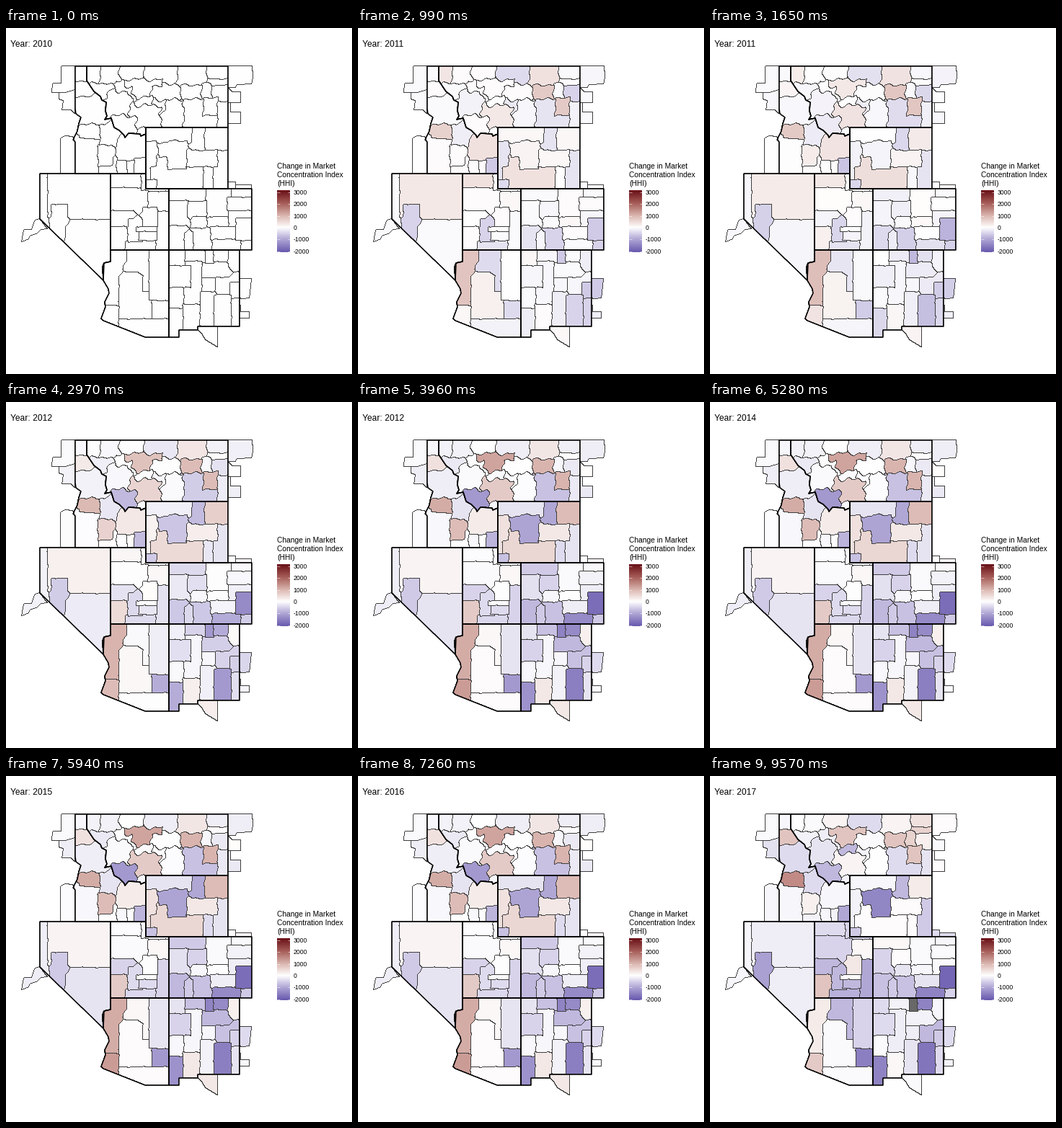
A matplotlib script that plays this animation: 480x480 px, repeating every 9900 ms.

```python
import numpy as np
import matplotlib.pyplot as plt
from matplotlib.animation import FuncAnimation
from matplotlib.colors import LinearSegmentedColormap
from matplotlib.patches import Polygon
from matplotlib.path import Path

SIZE, FRAMES, STEP = 480, 30, 330
YEARS = [2010, 2011, 2012, 2014, 2015, 2016, 2017]
KEYS = [0, 3, 12, 23, 29]
LOW, HIGH = -21, 31.5
LINE = (0.25, 0.25, 0.25)

STOPS = [(LOW, "#6858ae"), (-10, "#b1a8d6"), (0, "#ffffff"),
         (10, "#dab5af"), (20, "#a9625d"), (HIGH, "#6a1017")]
ramp = LinearSegmentedColormap.from_list(
    "hhi", [((v - LOW) / (HIGH - LOW), c) for v, c in STOPS], 512)

fig = plt.figure(figsize=(4.8, 4.8), dpi=100, facecolor="white")
ax = fig.add_axes([0, 0, 1, 1])
ax.axis("off")

Y, X = np.mgrid[0:SIZE, 0:SIZE] + 0.5
points = np.column_stack([X.ravel(), Y.ravel()])

# Ragged county lines, roughest in the northern mountains
rng = np.random.default_rng(4)
rough = 0.3 + 1.6 * np.exp(-((X - 190) / 80) ** 2 - ((Y - 105) / 55) ** 2)


def wiggle(along, across):
    a, b = rng.uniform(0, 2 * np.pi, 2)
    return rough * (np.sin(along / 2.3 + a) + np.sin(along / 5 + across / 9 + b))


U, V = X + wiggle(Y, X), Y + wiggle(X, Y)
owner = np.full(X.shape, -1)
gap = np.full(X.shape, np.inf)
tracks = []


def claim(where, dist, early, mid, late):
    won = where & (dist <= gap)
    owner[won] = len(tracks)
    gap[won] = dist[won]
    tracks.append([0, early, mid, mid, late])


def inside(xy):
    return Path(np.reshape(xy, (-1, 2))).contains_points(points).reshape(X.shape)


def outer(early, mid, late, *xy):
    """A single area beyond the state lines."""
    claim(inside(xy), np.zeros(X.shape), early, mid, late)


def state(*xy):
    ax.add_patch(Polygon(np.reshape(xy, (-1, 2)), fill=False, ec="black",
                         lw=1.1, joinstyle="round", zorder=4))
    return inside(xy)


def county(where, x0, y0, x1, y1, early, mid, late):
    """A box of the state; gaps go to the nearest box, later boxes lie on top.
    The last three numbers are index changes in hundreds."""
    dx = np.maximum(np.maximum(x0 - U, U - x1), 0)
    dy = np.maximum(np.maximum(y0 - V, V - y1), 0)
    claim(where, np.hypot(dx, dy), early, mid, late)


outer(-.5, -.5, -.5, 77, 53, 96, 53, 96, 86, 82, 90, 64, 90, 65, 77, 77, 77)
outer(-.5, -2, -3.5, 74, 90, 82, 90, 96, 86, 96, 119, 90, 114, 78, 114, 80, 101, 74, 99)
outer(0, -.3, -1, 76, 202, 76, 153, 82, 150, 93, 151, 96, 158, 96, 202)
outer(-.5, -2, -1, 47, 265, 58, 279, 48, 280, 44, 285, 33, 289, 32, 293, 22, 297, 25, 280, 36, 280, 40, 267)
outer(-1, -2, .5, 308, 53, 342, 53, 343, 68, 341, 78, 320, 79, 319, 83, 308, 83)
outer(-.5, .3, -.5, 308, 83, 314, 89, 326, 89, 326, 104, 308, 104)
outer(-.5, -2.5, .5, 308, 104, 312, 104, 312, 117, 326, 117, 326, 133, 308, 133)
outer(-.5, -.3, -4, 308, 214, 319, 214, 319, 223, 308, 223)
outer(.5, 1.5, -4, 319, 218, 341, 218, 341, 223, 319, 223)
outer(-6, -4, -4, 324, 348, 341, 348, 338, 375, 327, 376, 324, 373)
outer(-2, -.8, -1.5, 324, 385, 326, 385, 326, 394, 338, 394, 338, 403, 324, 403)
outer(1, 3, -.5, 266, 414, 294, 414, 294, 443, 277, 433, 272, 424, 266, 419)

DIVIDE = [112, 53, 112, 73, 122, 88, 131, 95, 133, 100, 139, 103, 138, 115,
          140, 122, 137, 127, 146, 125, 150, 138, 157, 142, 164, 149, 165, 152,
          170, 146, 186, 147, 187, 150, 194, 147]

montana = state(*DIVIDE, 194, 138, 308, 138, 308, 53)
county(montana, 112, 53, 131, 77, 3.5, -1.5, 0)
county(montana, 131, 53, 158, 77, .5, -1.5, -.5)
county(montana, 158, 53, 191, 71, .5, 0, 1.5)
county(montana, 191, 53, 238, 76, -4, -2, -4)
county(montana, 238, 53, 279, 79, 4, 3.2, 1.5)
county(montana, 279, 53, 308, 71, -.5, -2, 4)
county(montana, 279, 71, 308, 80, .5, .5, 6)
county(montana, 272, 77, 286, 97, -.5, -1, 6)
county(montana, 286, 80, 308, 102, -5, -2.5, 2)
county(montana, 245, 80, 272, 99, 7, 10, 8)
county(montana, 243, 99, 293, 138, -3, -7, -4)
county(montana, 274, 97, 294, 122, 7, 10, 8)
county(montana, 294, 103, 308, 138, -1.5, -2.5, -3)
county(montana, 200, 79, 239, 100, .5, 0, -.5)
county(montana, 218, 100, 247, 138, -1, -.3, 0)
county(montana, 203, 100, 221, 118, -2.5, -.3, -1.5)
county(montana, 153, 75, 176, 100, .5, -.2, -2)
county(montana, 165, 72, 216, 82, .5, 12, 8)
county(montana, 176, 82, 201, 95, .5, 12, 8)
county(montana, 183, 95, 205, 112, 0, -.5, -8)
county(montana, 118, 77, 146, 97, -.5, -2.5, -1.5)
county(montana, 141, 88, 172, 121, -1.5, -.5, -3)
county(montana, 173, 108, 214, 138, 3, 7, 1.5)
county(montana, 186, 138, 194, 150, 0, -1, -1.5)
county(montana, 148, 123, 180, 150, .5, -12, -8)

idaho = state(*DIVIDE, 194, 202, 96, 202, 96, 158, 93, 155, 99, 143, 101, 133,
              104, 124, 97, 119, 96, 112, 96, 53)
county(idaho, 96, 53, 112, 74, -.5, -1, -1)
county(idaho, 96, 74, 118, 96, .5, 4, 8)
county(idaho, 96, 96, 139, 134, -.5, -2, -4)
county(idaho, 96, 150, 128, 202, .5, -.8, -1)
county(idaho, 103, 134, 131, 154, 6, 11, 15)
county(idaho, 131, 134, 156, 163, -2, -3, -4)
county(idaho, 130, 180, 188, 202, .5, .2, -1.5)
county(idaho, 154, 184, 168, 202, .5, -.8, -1)
county(idaho, 128, 163, 149, 192, .5, 9, 2)
county(idaho, 155, 152, 194, 184, 4, 2.5, -1)
county(idaho, 178, 181, 194, 202, -6, -8.5, -10)

wyoming = state(194, 138, 308, 138, 308, 223, 194, 223)
county(wyoming, 194, 150, 209, 211, -3, 4, -1.5)
county(wyoming, 194, 138, 258, 158, 1, -3, -1)
county(wyoming, 201, 193, 274, 223, 4, 5.5, .5)
county(wyoming, 210, 177, 224, 196, 4, 5.5, .5)
county(wyoming, 213, 160, 251, 180, 1.5, -10.5, -14.5)
county(wyoming, 225, 157, 251, 196, 1.5, -10.5, -14.5)
county(wyoming, 194, 211, 210, 223, -4, -7, -6)
county(wyoming, 258, 138, 276, 170, -3, -10, -8)
county(wyoming, 276, 138, 308, 170, 1, 9, 2.5)
county(wyoming, 288, 170, 308, 223, -3, -3, -6)
county(wyoming, 251, 170, 294, 193, 1, 3, .5)
county(wyoming, 274, 193, 288, 223, 0, -4, .5)

nevada = state(47, 202, 145, 202, 145, 324, 136, 326, 135, 350, 47, 265)
county(nevada, 47, 202, 58, 275, -.5, -2, -1)
county(nevada, 88, 270, 145, 350, -.5, -3, -2)
county(nevada, 58, 202, 145, 262, 3, 1.5, -2)
county(nevada, 63, 245, 86, 270, -5, -6, -11)
county(nevada, 65, 270, 78, 290, -5, -6, -11)

utah = state(145, 202, 194, 202, 194, 223, 226, 223, 226, 308, 145, 308)
county(utah, 145, 223, 198, 254, .5, -.5, -5)
county(utah, 145, 202, 188, 221, 4, -.3, -4)
county(utah, 188, 203, 226, 226, .5, -.8, -5)
county(utah, 197, 228, 226, 254, 1, 1, 1)
county(utah, 145, 254, 177, 276, 0, -5, -8)
county(utah, 145, 276, 168, 308, .5, 7, 8)
county(utah, 208, 255, 226, 308, -.5, -5, -10)
county(utah, 166, 296, 208, 308, -3, -4.5, -9)
county(utah, 170, 265, 190, 297, -5, -4, -8)
county(utah, 185, 283, 210, 295, -.5, -4, -8)
county(utah, 181, 276, 210, 283, 0, -.5, .5)
county(utah, 190, 249, 211, 276, .5, .2, 3)

arizona = state(145, 308, 226, 308, 226, 429, 193, 429, 135, 406, 132, 403, 138, 387,
                137, 380, 143, 368, 142, 362, 135, 350, 134, 331, 136, 326, 145, 324)
county(arizona, 132, 324, 157, 385, 8, 11, 2.5)
county(arizona, 145, 308, 168, 324, 8, 11, 2.5)
county(arizona, 132, 385, 157, 414, 1, 13, 7)
county(arizona, 157, 345, 203, 404, 2, .5, -.5)
county(arizona, 168, 308, 199, 333, -4, 1, -8)
county(arizona, 190, 333, 199, 366, -4, 1, -8)
county(arizona, 199, 308, 226, 378, 0, -3, -5)
county(arizona, 203, 379, 226, 404, -4, -12, -15.5)
county(arizona, 157, 404, 226, 429, -1.5, .5, -.5)

colorado = state(226, 223, 341, 223, 341, 308, 226, 308)
county(colorado, 226, 240, 252, 274, -.5, -3.5, -5)
county(colorado, 226, 223, 276, 240, -.5, -6, 1)
county(colorado, 252, 241, 282, 262, -1, -5, .5)
county(colorado, 260, 262, 277, 278, -.5, -1, -3)
county(colorado, 279, 223, 313, 262, .5, -.5, -.5)
county(colorado, 313, 223, 341, 235, -.5, -.7, -1)
county(colorado, 307, 235, 341, 254, .5, -1.5, -.5)
county(colorado, 309, 254, 341, 276, -1, -2, -.5)
county(colorado, 282, 262, 309, 276, 1, 0, -1)
county(colorado, 226, 275, 250, 308, -3, -8, -7)
county(colorado, 248, 284, 260, 308, -1, -6, -6)
county(colorado, 260, 278, 284, 308, -5, -7, -7)
county(colorado, 284, 276, 319, 293, .5, -2, -3)
county(colorado, 326, 295, 341, 308, -5, -6, -5)
county(colorado, 289, 294, 326, 308, -.5, -14, -15)
county(colorado, 319, 264, 341, 295, -6, -18, -19)

new_mexico = state(226, 308, 324, 308, 324, 414, 266, 414, 266, 419, 240, 419, 240, 429, 226, 429)
county(new_mexico, 249, 324, 272, 384, -1, -1, -2)
county(new_mexico, 226, 308, 249, 330, 1, -3, -4)
county(new_mexico, 226, 330, 257, 360, -1, -5, -4)
county(new_mexico, 226, 360, 245, 389, -.5, -.8, -.5)
county(new_mexico, 249, 308, 277, 324, -1, -7, -1.5)
county(new_mexico, 272, 327, 309, 347, -.5, -8, -1.5)
county(new_mexico, 288, 308, 309, 323, -.5, -14, -15)
county(new_mexico, 309, 308, 324, 332, -2, 2, -1)
county(new_mexico, 291, 346, 324, 369, -1, -7, -8)
county(new_mexico, 311, 353, 324, 375, -6, -5, -6)
county(new_mexico, 272, 347, 291, 366, -1, -1, -2)
county(new_mexico, 270, 366, 292, 412, -2, -1.5, -3)
county(new_mexico, 289, 371, 313, 414, -5, -15.5, -17)
county(new_mexico, 313, 375, 324, 414, -5, -3, -4)
county(new_mexico, 246, 384, 269, 419, .5, 3, 1)
county(new_mexico, 226, 389, 246, 429, -2, -13, -15)
county(new_mexico, 277, 309, 288, 327, -6, -15, -16)
no_data = len(tracks) - 1

tracks = np.array(tracks)
# Boxes with the same track in one state form one county
same = np.unique(tracks, axis=0, return_inverse=True)[1].ravel()
twin = np.arange(len(tracks))
for k in twin[1:]:
    if same[k] == same[k - 1]:
        twin[k] = twin[k - 1]
owner = np.where(owner < 0, -1, twin[owner])

edges = np.zeros(owner.shape, bool)
edges[:, :-1] |= owner[:, :-1] != owner[:, 1:]
edges[:-1] |= owner[:-1] != owner[1:]


def text(x, y, s, size):
    return ax.text(x, y, s, fontsize=size * 0.72, family="Liberation Sans",
                   color="black", va="baseline", zorder=5)


for i, line in enumerate(["Change in Market", "Concentration Index", "(HHI)"]):
    text(376, 195 + 11.8 * i, line, 10.3)
ax.imshow(np.linspace(HIGH, LOW, 256)[:, None], cmap=ramp, vmin=LOW, vmax=HIGH,
          extent=(376, 394, 311, 225), aspect="auto", zorder=3)
for v in range(-2, 4):
    y = 277 - 16.45 * v
    text(398.5, y + 3, str(v * 1000), 8.7)
    for x in (376, 390.5):
        ax.plot([x, x + 3.5], [y, y], color="white", lw=0.4,
                solid_capstyle="butt", zorder=4)

title = text(5.5, 26, "Year: 2010", 12)
chart = ax.imshow(np.ones((SIZE, SIZE, 3)), extent=(0, SIZE, SIZE, 0),
                  interpolation="nearest", zorder=1)
ax.set(xlim=(0, SIZE), ylim=(SIZE, 0))


def draw(i):
    k = min(np.searchsorted(KEYS, i, side="right") - 1, len(KEYS) - 2)
    t = (i - KEYS[k]) / (KEYS[k + 1] - KEYS[k])
    values = tracks[:, k] * (1 - t) + tracks[:, k + 1] * t
    colours = ramp((values - LOW) / (HIGH - LOW))[:, :3]
    fade = max(0, (i - 24) / 5)
    colours[no_data] = colours[no_data] * (1 - fade) + 0.41 * fade
    picture = np.vstack([colours, [1, 1, 1]])[owner]
    picture[edges] = LINE
    chart.set_data(picture)
    step = int(i * (len(YEARS) - 1) / (FRAMES - 1) + 0.5)
    title.set_text(f"Year: {YEARS[step]}")
    return chart, title


anim = FuncAnimation(fig, draw, frames=FRAMES, interval=STEP, repeat=True,
                     repeat_delay=0, blit=False)
plt.show()
```
